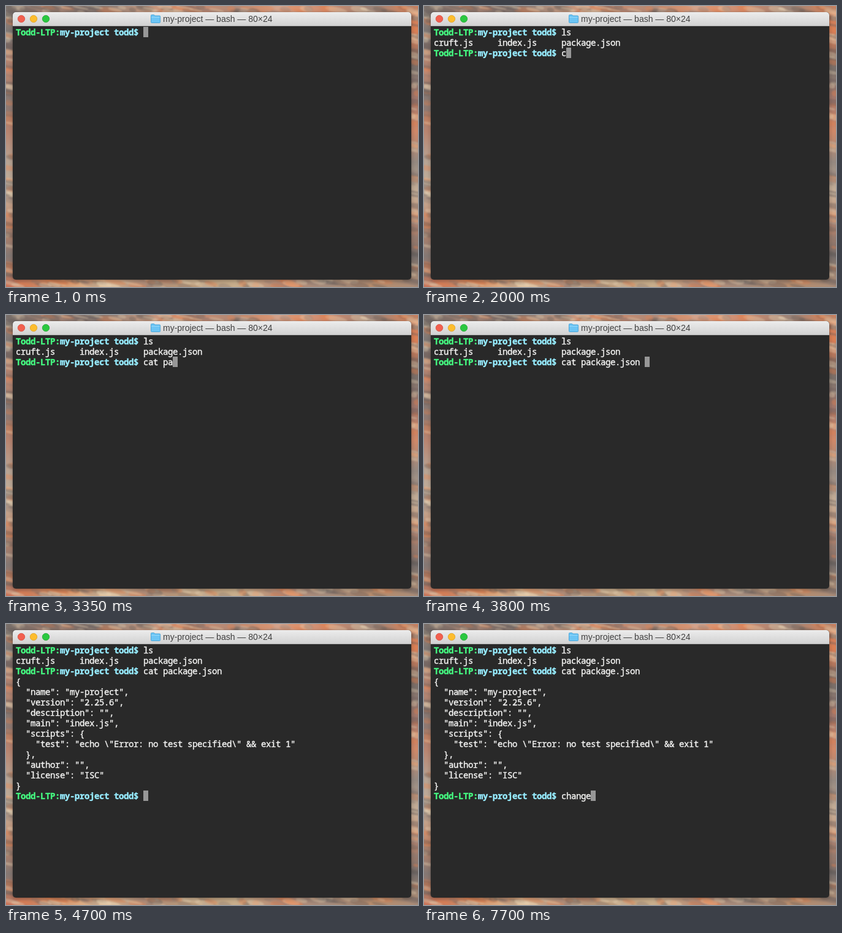
These frames come from a looping animation (672 px wide and 459 px high, 8000 ms). An HTML page with a canvas:

```html
<!DOCTYPE html>
<html lang="en">
<head>
<meta charset="utf-8">
<title>Terminal</title>
<style>
  html, body { margin: 0; width: 100%; height: 100%; overflow: hidden; }
  body { position: relative; background: #a98470; }
  canvas { position: absolute; left: 0; top: 0; }
  #window, #shadow {
    position: absolute; left: 11px; top: 10px; width: 650px; height: 437px;
    border-radius: 5px;
  }
  #window { overflow: hidden; background: #292929; }
  #shadow { box-shadow: 0 2px 6px rgba(0, 0, 0, .3), 0 0 1px rgba(0, 0, 0, .5); }
  #bar {
    height: 22px; border-bottom: 1px solid #b4b4b4;
    background: linear-gradient(#ececec, #d2d2d2);
  }
  #bar svg { position: absolute; left: 0; top: 0; }
  #bar text { font: 14px "Liberation Sans", Arial, sans-serif; fill: #404040; }
  pre {
    position: absolute; left: 5px; top: 24px; margin: 0; color: #f4f4f3;
    font: 14px/17px "Noto Sans Mono", "DejaVu Sans Mono", monospace;
    letter-spacing: calc(8px - 1ch); font-variant-ligatures: none;
    -webkit-text-stroke: .4px;
  }
  pre b { color: #45f880; }
  pre i { color: #97ecfe; font-style: normal; }
  pre u { display: inline-block; width: 8px; height: 17px; vertical-align: top; background: #979797; }
</style>
</head>
<body>
<canvas id="sky" width="672" height="459"></canvas>
<div id="shadow"></div>
<div id="window">
  <div id="bar">
    <svg width="650" height="23">
      <g stroke-width=".8">
        <circle cx="14" cy="11" r="5.7" fill="#f2604f" stroke="#d64c3e"/>
        <circle cx="34" cy="11" r="5.7" fill="#fdbd2e" stroke="#dfa023"/>
        <circle cx="54" cy="11" r="5.7" fill="#2bc840" stroke="#1ea832"/>
      </g>
      <path d="M225.5 5.5q0-1 1-1h4l1.5 1.5h7.500q1 0 1 1v9.500q0 1-1 1h-13q-1 0-1-1z" fill="#6cc5f5" stroke="#4ba5d8"/>
      <path d="M226 8.500h14" stroke="#94d8fa"/>
      <text x="245" y="16">my-project — bash — 80×24</text>
    </svg>
  </div>
  <pre id="screen"></pre>
</div>
<script>
const LOOP = 8000;
const prompt = '<b>Todd-LTP:<i>my-project todd$</i></b> ';
const listed = prompt + 'ls\ncruft.js     index.js     package.json\n' + prompt;
const catted = listed + 'cat package.json';
const json = String.raw`{
  "name": "my-project",
  "version": "2.25.6",
  "description": "",
  "main": "index.js",
  "scripts": {
    "test": "echo \"Error: no test specified\" &amp;&amp; exit 1"
  },
  "author": "",
  "license": "ISC"
}
`;
const printed = catted + '\n' + json + prompt;

// Start time of each screen and the text before its cursor
const steps = [
  [0, prompt],
  [500, prompt + 'ls'],
  [800, prompt + 'ls\n'],
  [950, listed],
  [2000, listed + 'c'],
  [2150, listed + 'cat'],
  [2600, listed + 'cat '],
  [2900, listed + 'cat'],
  [3050, listed + 'cat '],
  [3350, listed + 'cat pa'],
  [3500, listed + 'cat pac'],
  [3650, listed + 'cat pack'],
  [3800, catted + ' '],
  [4550, catted + '\n'],
  [4700, printed],
  [7250, printed + 'c'],
  [7400, printed + 'cha'],
  [7550, printed + 'chang'],
  [7700, printed + 'change'],
];

function paintSky() {
  const ctx = document.getElementById('sky').getContext('2d');
  let seed = 11;
  const random = () => (seed = seed * 16807 % 2147483647) / 2147483647;
  const strip = (x, y, w, h, colors) => {
    const fade = w > h ? ctx.createLinearGradient(0, 0, 672, 0) : ctx.createLinearGradient(0, 0, 0, 459);
    colors.split(' ').forEach((c, i, all) => fade.addColorStop(i / (all.length - 1), '#' + c));
    ctx.fillStyle = fade;
    ctx.fillRect(x, y, w, h);
  };
  strip(0, 0, 672, 230, '857a74 a88474 7c706c c49a82 d08a6c b08a78 d6a48c d08a6c 9c8478 e08458');
  strip(0, 230, 672, 229, 'c8745a d08a62 e0bc94 b08c78 b89878 c8ae8c b88a74 a48c7c b88c6c a88c78');
  strip(0, 8, 14, 442, '988880 787270 c88a70 847874 b88470 b8a494 c4b09c c08468 847874 c4785c');
  strip(658, 8, 14, 442, 'e0845a cc7c5a 706864 a4786c d08868 948880 c8b098 b8846c 746c6a b89478');

  // Soft streaks of cloud
  const tones = ['#e8804e', '#5e5856', '#ecd8b8', '#8c7a72'];
  ctx.filter = 'blur(1px)';
  ctx.globalAlpha = .35;
  for (let i = 0; i < 320; i++) {
    const side = random() < .45;
    const edge = random() < .5;
    const x = side ? (edge ? 0 : 661) + random() * 11 : random() * 672;
    const y = side ? random() * 459 : (edge ? 0 : 447) + random() * 12;
    ctx.fillStyle = tones[Math.floor(random() * tones.length)];
    ctx.beginPath();
    ctx.ellipse(x, y, 5 + random() * 15, 1.5 + random() * 4, .2, 0, 7);
    ctx.fill();
  }
}

const screen = document.getElementById('screen');
const start = performance.now();
let shown;

function draw() {
  const time = (performance.now() - start) % LOOP;
  const step = steps.findLast(([at]) => at <= time);
  if (step !== shown) {
    shown = step;
    screen.innerHTML = step[1] + '<u></u>';
  }
  requestAnimationFrame(draw);
}

paintSky();
draw();
</script>
</body>
</html>
```
